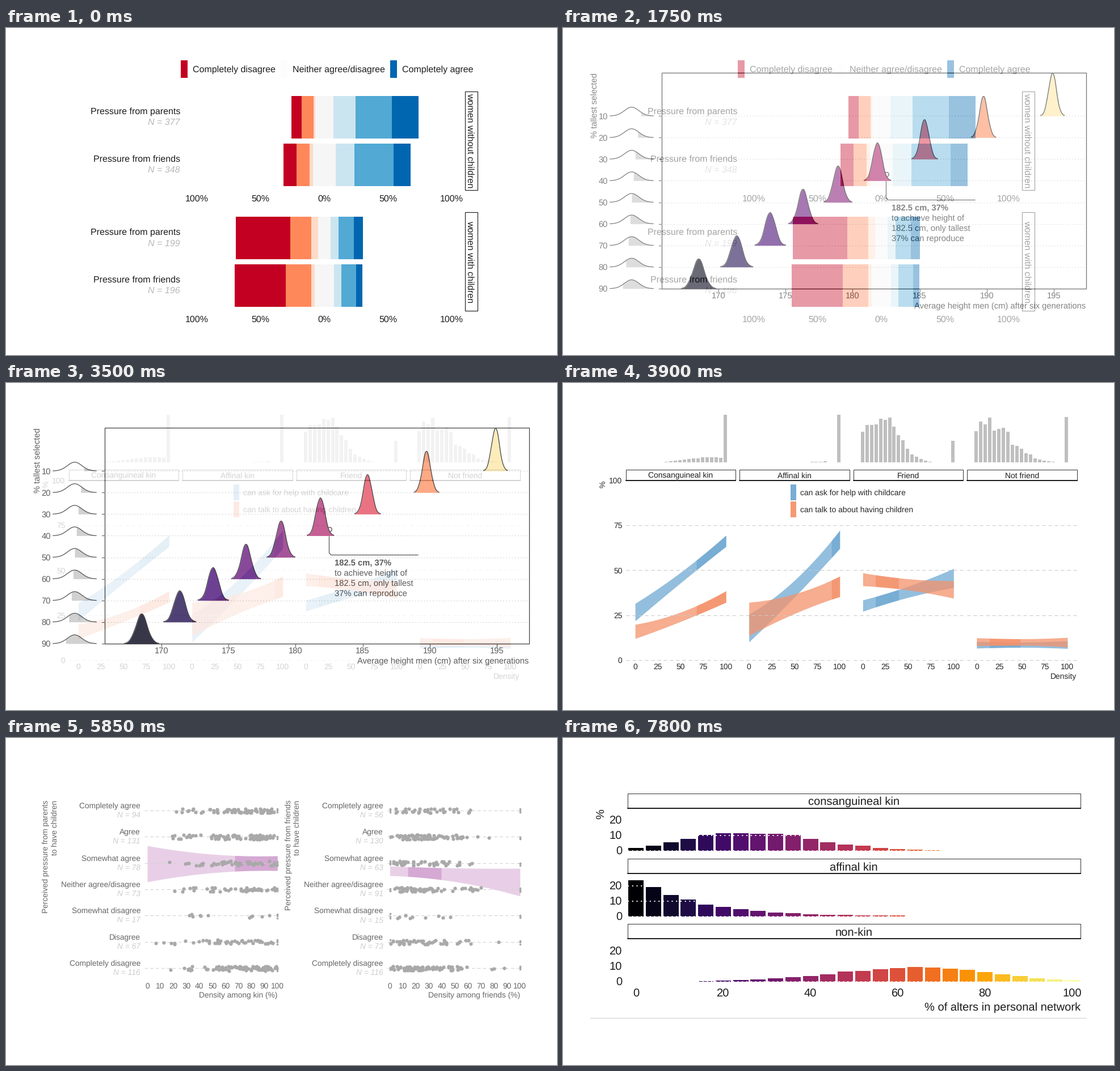
Write a matplotlib script that moves like this. It is 971 px wide and 577 px high and loops after 8 s.

```python
import numpy as np
import matplotlib.pyplot as plt
from matplotlib.animation import FuncAnimation

W, H, DPI = 971, 577, 64
PT = 72 / DPI  # points per pixel
STEP, FRAMES, FADE = 50, 160, 10
FADE_STARTS = (1500 + 1950 * np.arange(4)) // STEP

plt.rcParams.update({'font.family': 'Liberation Sans', 'text.hinting': 'none'})
fig = plt.figure(figsize=(W / DPI, H / DPI), dpi=DPI, facecolor='white')


def text(ax, x, y, s, size, color='#1c1c1c', ha='left', rot=0, **kw):
    ax.text(x, y, s, fontsize=size * PT, color=color, ha=ha, va='baseline',
            rotation=rot, rotation_mode='anchor', **kw)


def rect(ax, x0, y0, x1, y1, color, edge='none', lw=0):
    ax.add_patch(plt.Rectangle((x0, y0), x1 - x0, y1 - y0, facecolor=color,
                               edgecolor=edge, linewidth=lw * PT))


def line(ax, xs, ys, color, lw=1.0, dash=None, **kw):
    style = (0, dash) if dash else '-'
    ax.plot(xs, ys, color=color, lw=lw * PT, ls=style, **kw)


def strip(ax, x0, y0, x1, y1, label, base, size):
    rect(ax, x0, y0, x1, y1, 'white', '#333333', 1)
    line(ax, [x0, x1], [y1, y1], 'black', 1.6)
    text(ax, (x0 + x1) / 2, base, label, size, ha='center')


def bump(v, peak, center, left, right):
    """Bell with its own spread on either side."""
    return peak * np.exp(-((v - center) / np.where(v < center, left, right))
                         ** 2 / 2)


def band(ax, x0, x1, ends, widths, sag, color, alpha, dark):
    """Confidence ribbon, narrower mid-way, painted twice over `dark`."""
    def arc(pair, mid):
        return np.polyfit([0, .5, 1], [pair[0], mid, pair[1]], 2)

    center = arc(ends, np.mean(ends) + sag)
    half = arc(widths, .73 * np.mean(widths))
    for a, b in ((0, 1), dark):
        t = np.linspace(a, b, 60)
        y, w = np.polyval(center, t), np.polyval(half, t)
        ax.fill_between(x0 + (x1 - x0) * t, y - w, y + w, color=color,
                        alpha=alpha, lw=0)


def pressure_bars(ax):
    colors = ['#c30021', '#ff885b', '#fedbc9', '#f6f6f6',
              '#cbe5f0', '#51a9d4', '#0166b0']
    for x, c, label in ((308, colors[0], 'Completely disagree'),
                        (484, '#fcfcfc', 'Neither agree/disagree'),
                        (677, colors[-1], 'Completely agree')):
        rect(ax, x, 57, x + 11.5, 88, c)
        text(ax, x + 21, 78, label, 16)

    # N and the share of each answer in percent, per bar
    groups = [('women without children',
               [(377, [8, 9.5, 1.5, 14, 17.5, 28.5, 21]),
                (348, [10.5, 10, 3, 17.5, 14.7, 30.7, 13.6])]),
              ('women with children',
               [(199, [43, 16.3, 5.4, 10, 6.2, 12, 7.1]),
                (196, [40, 20, 2.7, 15.2, 5.8, 11.5, 4.8])])]
    unit = 2.245
    for g, (group, bars) in enumerate(groups):
        top = 112 + 213.2 * g
        for b, (who, (n, share)) in enumerate(zip(('parents', 'friends'), bars)):
            y = top + 7.8 + 83.7 * b
            # the neutral answer is centred on zero
            x = 561 - unit * (sum(share[:3]) + share[3] / 2)
            for s, c in zip(share, colors):
                rect(ax, x, y, x + unit * s, y + 75, c)
                x += unit * s
            text(ax, 307, y + 32, f'Pressure from {who}', 16, ha='right')
            text(ax, 307, y + 51.5, f'N = {n}', 16, '#b9b9b9', 'right',
                 style='italic')
        rect(ax, 808.5, top, 830.5, top + 174, 'white', '#222222', 1.2)
        text(ax, 813.5, top + 87, group, 16, ha='center', rot=270)
        for v in range(-100, 101, 50):
            text(ax, 561 + unit * v, top + 193.5, f'{abs(v)}%', 16, ha='center')


def height_ridges(ax):
    size, ink = 14.8, '#333333'
    z = np.linspace(-3, 3, 121)
    normal = np.exp(-z * z / 2)
    magma = plt.get_cmap('magma')

    share = np.arange(1, 10) / 10
    cuts = np.log(1 / share - 1) / 1.7  # normal quantiles, logistic rule
    gain = np.exp(-cuts ** 2 / 2) / np.sqrt(2 * np.pi) / share
    rise = (gain - gain[-1]) / (gain[0] - gain[-1])

    for k, (cut, r) in enumerate(zip(cuts, rise)):
        y = 155.2 + 38.08 * k
        text(ax, 79, y + 5.3, str(10 * (k + 1)), size, ink, 'right')
        line(ax, [169, 173.5], [y, y], ink, 1.1)
        if k < 8:
            line(ax, [174, 921], [y, y], '#c4c4c4', 1.2, (1.3, 3))

        bell = y - 15.5 * normal
        tail = z >= cut
        ax.fill_between(121 + 12.7 * z[tail], bell[tail], y, color='#c6c6c6',
                        lw=0)
        line(ax, 121 + 12.7 * z, bell, '#222222', 1.2)

        h = 75.5 - 2.9 * k
        wobble = 1 + .035 * np.sin(3.1 * z + 1.7 * k) * np.abs(z)
        ridge = y - h * normal * wobble
        xs = 239 + 623.7 * r + 525 / h * z
        ax.fill_between(xs, ridge, y, color=magma(.05 + .9 * r), lw=0, zorder=3)
        line(ax, xs, ridge, '#1a1a1a', 1.3, zorder=4)

    rect(ax, 173.5, 79.3, 921.5, 460, 'none', '#1a1a1a', 1.3)
    for i in range(6):
        x = 273.7 + 118.3 * i
        line(ax, [x, x], [460, 464.5], ink, 1.1)
        text(ax, x, 477.3, str(170 + 5 * i), size, ink, 'center')
    text(ax, 921.5, 495.2, 'Average height men (cm) after six generations',
         size, ink, 'right')
    text(ax, 61, 79.5, '% tallest selected', size, ink, 'right', 90)

    ax.plot(569.5, 258, 'o', ms=7.6 * PT, mfc='white', mec='#222222',
            mew=1.3 * PT)
    line(ax, [569.5, 569.5, 573, 726], [271, 300, 303.5, 303.5], ink, 1.3)
    notes = ['182.5 cm, 37%', 'to achieve height of',
             '182.5 cm, only tallest', '37% can reproduce']
    for i, s in enumerate(notes):
        text(ax, 579, 322 + 17.9 * i, s, size, ink,
             weight='normal' if i else 'bold')


def density_panels(ax):
    size, ink = 13.9, '#262626'
    blue, orange = '#6fa8d2', '#f4926b'
    rng = np.random.default_rng(3)
    v = np.arange(0, 100, 5)
    # name, dark share, histogram bump, bar at 100, ribbons (ends, widths, sag)
    panels = [
        ('Consanguineal kin', (.675, 1), (9, 78, 21, 30), 84,
         ((404.5, 278.7), (15.5, 9.8), 2), ((438.5, 377), (12.5, 10), 5)),
        ('Affinal kin', (.91, 1), (1.5, 80, 12, 12), 84,
         ((432.5, 276), (24.5, 16), 9), ((416.5, 359), (29.5, 18), 2)),
        ('Friend', (.14, .395), (77, 21, 24, 19), 38,
         ((393, 344.3), (10, 16.8), 0), ((346.5, 364.5), (11.5, 15.5), 0)),
        ('Not friend', (.14, .48), (74, 12, 25, 25), 80,
         ((462, 461.8), (6, 6.8), 0), ((456.8, 457.5), (7.2, 8.5), 0)),
    ]
    for i, (name, dark, shape, full, blues, oranges) in enumerate(panels):
        left = 110.5 + 200.6 * i
        x = left + 16.6
        bars = bump(v, *shape) * rng.normal(1, .1, len(v))
        for j, h in enumerate([*bars, full]):
            if h > 1:
                bx = x - .5 + 7.95 * j
                rect(ax, bx - 3, 140 - h, bx + 3, 140, '#bfbfbf')
        for y in 251.3 + 79.1 * np.arange(4):
            line(ax, [left, left + 193.5], [y, y], '#cacaca', 1.1, (5.5, 4.5))
        band(ax, x, x + 160, *blues, blue, .75, dark)
        band(ax, x, x + 160, *oranges, orange, .75, dark)
        strip(ax, left, 153, left + 193.5, 172, name, 167.5, size)
        for tick in range(0, 101, 25):
            text(ax, x + 1.6 * tick, 505.3, str(tick), size, ink, 'center')

    for i in range(5):
        text(ax, 104.5, 177.2 + 79.1 * i, str(100 - 25 * i), size, ink, 'right')
    text(ax, 74, 173, '%', size, ink, 'right', 90)
    text(ax, 905.5, 522, 'Density', size, ink, 'right')
    for y, c, s in ((178.5, '#78add5', 'can ask for help with childcare'),
                    (208.7, '#f59874', 'can talk to about having children')):
        rect(ax, 400.5, y, 410.5, y + 28, c)
        text(ax, 418.5, y + 19.3, s, size, ink)


def pressure_dots(ax):
    size, ink, gray, unit = 13.8, '#666666', '#a9a9a9', 2.293
    rng = np.random.default_rng(7)
    labels = ['Completely agree', 'Agree', 'Somewhat agree',
              'Neither agree/disagree', 'Somewhat disagree', 'Disagree',
              'Completely disagree']
    # left, people, axis unit, N per row, beta spread, stacked ends, ribbon, dark
    panels = [
        (249, 'parents', 'kin', [94, 131, 78, 73, 17, 67, 116], (2.6, 1.3),
         [100], ((222, 221), (32, 13), 0), (.672, 1)),
        (676.5, 'friends', 'friends', [56, 130, 63, 91, 15, 73, 116], (1.6, 3.8),
         [0, 100], ((234.5, 254.5), (8.5, 24.5), -3), (.138, .395)),
    ]
    for x0, who, axis, counts, spread, ends, ribbon, dark in panels:
        band(ax, x0, x0 + 100 * unit, *ribbon, '#8b0f85', .195, dark)
        for k, (label, n) in enumerate(zip(labels, counts)):
            y = 128 + 46.35 * k
            text(ax, x0 - 12, y - 4, label, size, ink, 'right')
            text(ax, x0 - 12, y + 12, f'N = {n}', size, '#cdcdcd', 'right',
                 style='italic')
            line(ax, [x0 - 5, x0 + 232], [y, y], '#d2d2d2', 1.1, (5, 4))
            dots = 100 * rng.beta(*spread, int(.7 * n))
            stack = np.repeat(ends, 4)
            for vals, d in ((dots, 6.2), (stack, 3.6)):
                ys = y + rng.uniform(-3.5, 4.5, len(vals))
                ax.scatter(x0 + unit * vals, ys, s=(d * PT) ** 2, c=gray, lw=0,
                           zorder=3)
        for v in range(0, 101, 10):
            text(ax, x0 + unit * v, 442, str(v), size, ink, 'center')
        text(ax, x0 + 100 * unit, 458, f'Density among {axis} (%)', size, ink,
             'right')
        tx = x0 - 174.7
        text(ax, tx, 109.5, f'Perceived pressure from {who}', size, ink,
             'right', 90)
        text(ax, tx + 15.5, 109.5, 'to have children', size, ink, 'right', 90)


def network_bars(ax):
    size, unit = 20.15, 2.7
    cmap = plt.get_cmap('inferno')
    rng = np.random.default_rng(5)
    v = np.arange(0, 101, 4)
    panels = [('consanguineal kin', bump(v, 12, 24, 13, 17)),
              ('affinal kin', 26 * np.exp(-v / 14)),
              ('non-kin', bump(v, 9.3, 66, 19, 16))]
    for p, (name, shares) in enumerate(panels):
        top = 97.5 + 115.3 * p
        base = top + 101.7
        for i, s in enumerate(shares * rng.normal(1, .06, len(v))):
            if s > .25:
                x = 128.5 + 30.75 * i
                rect(ax, x - 13.5, base - unit * s, x + 13.5, base, cmap(i / 25))
        for tick in (0, 10, 20):
            y = base - unit * tick
            line(ax, [114, 911], [y, y], 'white', 1.8, (1.2, 3.1), zorder=3)
            text(ax, 104, y + 7, str(tick), size, ha='right')
        strip(ax, 113.5, top, 911.5, top + 26, name, top + 20.5, size)

    for i in range(6):
        text(ax, 128.5 + 153.75 * i, 457, str(20 * i), size, ha='center')
    text(ax, 912, 481, '% of alters in personal network', size, ha='right')
    text(ax, 73, 125.5, '%', size, ha='right', rot=90)
    line(ax, [48, 921.5], [494.2, 494.2], '#d6d6d6', 1.2)


def render(paint):
    """Paint one slide and return it as an RGB array."""
    ax = fig.add_axes([0, 0, 1, 1])
    ax.axis('off')
    ax.set_autoscale_on(False)
    paint(ax)
    ax.set(xlim=(0, W), ylim=(H, 0))
    fig.canvas.draw()
    pixels = np.asarray(fig.canvas.buffer_rgba())[..., :3].astype(float)
    ax.remove()
    return pixels


slides = [render(p) for p in (pressure_bars, height_ridges, density_panels,
                              pressure_dots, network_bars)]
screen = fig.figimage(slides[0].astype(np.uint8))


def update(i):
    pos = np.clip((i - FADE_STARTS + 1) / FADE, 0, 1).sum()
    k = int(pos)
    mix = pos - k
    img = slides[k]
    if mix > 0:
        img = (1 - mix) * img + mix * slides[k + 1]
    screen.set_data(np.rint(img).astype(np.uint8))
    return [screen]


anim = FuncAnimation(fig, update, frames=FRAMES, interval=STEP, repeat=True)
plt.show()
```
